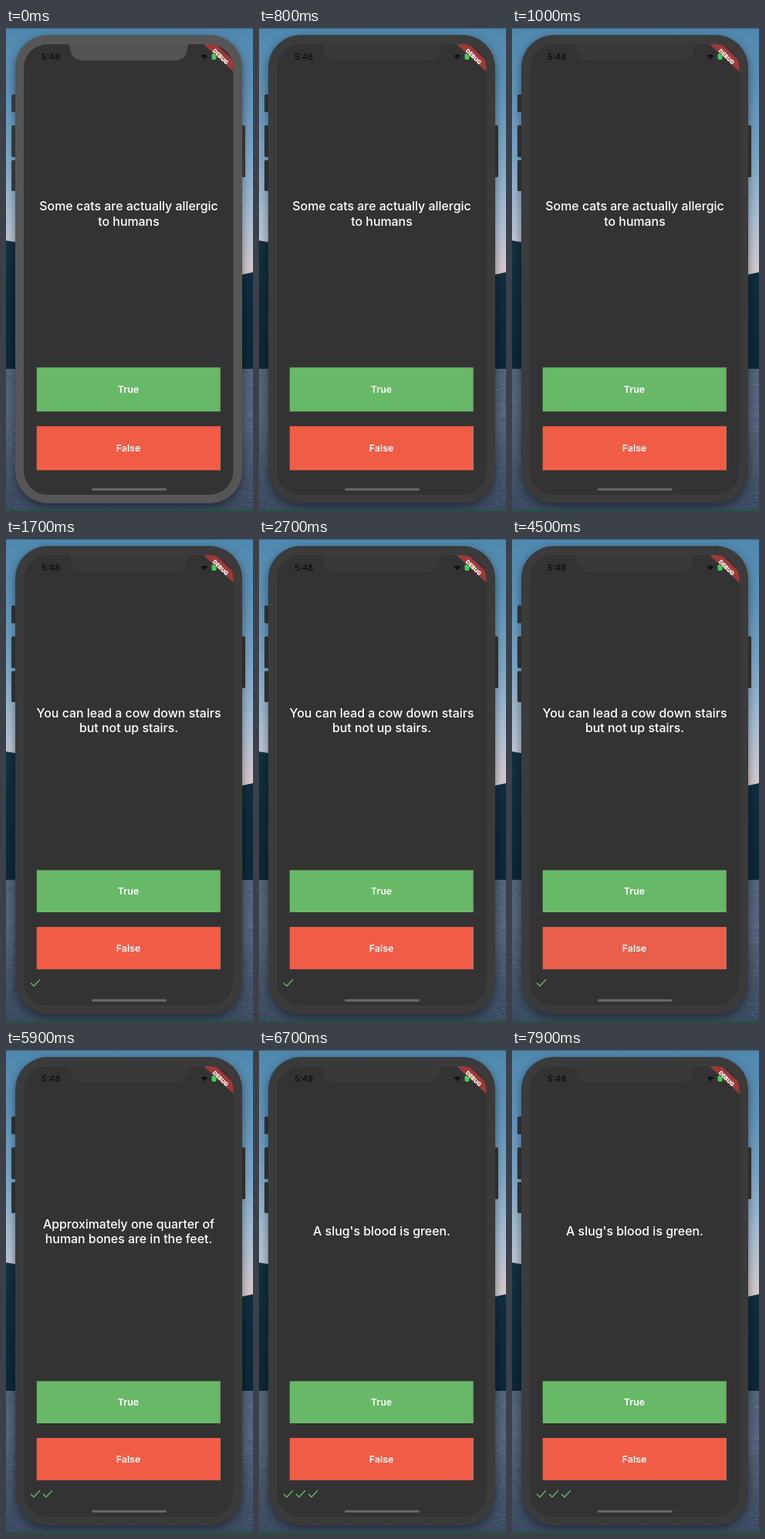
An HTML page with a canvas that plays this animation: 320x625 px, repeating every 8 s.

```html
<!DOCTYPE html>
<html lang="en">
<head>
<meta charset="utf-8">
<title>Quiz</title>
<style>
html, body { margin: 0; width: 100%; height: 100%; overflow: hidden; background: #333; }
canvas { display: block; }
</style>
</head>
<body>
<canvas id="stage" width="320" height="625"></canvas>
<script>
const ctx = document.getElementById('stage').getContext('2d');
const LOOP = 8000;
const GREEN = '#68b967', RED = '#f15c46';

const questions = [
  { from: 0, lines: ['Some cats are actually allergic', 'to humans'] },
  { from: 1400, lines: ['You can lead a cow down stairs', 'but not up stairs.'] },
  { from: 4620, lines: ['Approximately one quarter of', 'human bones are in the feet.'] },
  { from: 6080, lines: ["A slug's blood is green."] },
];
const taps = [
  { at: 1210, button: 'True', x: 190, dy: 2 },
  { at: 4430, button: 'False', x: 172, dy: 10 },
  { at: 5880, button: 'True', x: 192, dy: 2 },
];

const clamp = v => Math.max(0, Math.min(1, v));

function box(x, y, w, h, r, fill) {
  ctx.beginPath();
  ctx.roundRect(x, y, w, h, r);
  ctx.fillStyle = fill;
  ctx.fill();
}

function gradient(y0, y1, ...colors) {
  const g = ctx.createLinearGradient(0, y0, 0, y1);
  colors.forEach((c, i) => g.addColorStop(i / (colors.length - 1), c));
  return g;
}

function label(text, x, y, font, fill = '#fff', align = 'center') {
  ctx.font = font + ' Inter, sans-serif';
  ctx.textAlign = align;
  ctx.fillStyle = fill;
  ctx.fillText(text, x, y);
}

function stroke(points, color, width) {
  ctx.beginPath();
  points.forEach(([x, y]) => ctx.lineTo(x, y));
  ctx.strokeStyle = color;
  ctx.lineWidth = width;
  ctx.stroke();
}

function polygon(points, fill) {
  ctx.beginPath();
  points.forEach(([x, y]) => ctx.lineTo(x, y));
  ctx.fillStyle = fill;
  ctx.fill();
}

function landscape() {
  box(0, 0, 320, 330, 0, gradient(0, 325, '#4f88ae', '#5e92b8', '#7aa5c6', '#abbfd2', '#d9cbcd'));
  polygon([[0, 275], [12, 277], [160, 300], [306, 319], [320, 316], [320, 442], [0, 442]],
    gradient(275, 442, '#12303f', '#0e2b3c', '#0c2737'));
  box(0, 441, 320, 184, 0, gradient(441, 625, '#53637a', '#55647c', '#47566c', '#3a4a60'));
  let seed = 7;
  const random = () => (seed = seed * 16807 % 2147483647) / 2147483647;
  for (let i = 0; i < 260; i++) {
    const x = random() < .5 ? random() * 14 : 304 + random() * 16;
    const shade = random() < .5 ? '#2b3b5233' : '#8796aa33';
    box(x, 444 + random() * 178, 2 + random() * 5, 1, 0, shade);
  }
  box(0, 0, 320, 1, 0, '#35617c');
  box(0, 624, 320, 1, 0, '#066a26');
}

function phone(focus) {
  const shade = (from, to) => {
    const v = Math.round(from + (to - from) * focus);
    return `rgb(${v},${v},${v})`;
  };
  const side = shade(64, 54);
  for (const [x, y, h] of [[7, 86, 23], [7, 126, 41], [7, 171, 40], [304, 126, 67]]) {
    box(x, y, 6, h, 1.5, side);
  }
  ctx.save();
  ctx.shadowColor = 'rgba(0,0,0,.45)';
  ctx.shadowBlur = 12;
  ctx.shadowOffsetY = 4;
  box(12, 9, 294, 606, 42, shade(86, 59));
  ctx.restore();
  box(23, 21, 271.5, 583, 31, '#333');

  ctx.beginPath();
  ctx.moveTo(78, 21);
  ctx.quadraticCurveTo(83, 21, 83, 26);
  ctx.quadraticCurveTo(84, 42, 101, 42);
  ctx.lineTo(217, 42);
  ctx.quadraticCurveTo(234, 42, 235, 26);
  ctx.quadraticCurveTo(235, 21, 240, 21);
  ctx.fillStyle = shade(84, 57);
  ctx.fill();
  box(111, 595.5, 97, 3, 1.5, '#6a6a6a');
}

function statusBar() {
  label('5:48', 46, 41, '500 11px', '#0c0c0c', 'left');
  for (const r of [2, 5]) {
    ctx.beginPath();
    ctx.arc(257, 40.5, r, -Math.PI * .75, -Math.PI * .25);
    ctx.strokeStyle = '#080808';
    ctx.lineWidth = 2;
    ctx.stroke();
  }
  box(266.5, 33, 6, 8, 2, '#3fd05a');
  ctx.save();
  ctx.beginPath();
  ctx.roundRect(23, 21, 271.5, 583, 31);
  ctx.clip();
  polygon([[256, 21], [272, 21], [295, 43], [295, 57]], '#9c3a37');
  ctx.translate(278, 37);
  ctx.rotate(Math.PI / 4);
  label('DEBUG', 0, 2.6, '900 7.2px');
  ctx.restore();
}

function button(text, y, h, color, t) {
  box(38.5, y, 2, h, 0, color === RED ? '#7c2a22' : '#1d5a24');
  box(40, y, 237, h, 0, color);
  box(276.5, y, 1.5, h, 0, '#8c8480');
  ctx.save();
  ctx.beginPath();
  ctx.rect(40, y, 237, h);
  ctx.clip();
  for (const tap of taps) {
    const age = t - tap.at;
    if (tap.button !== text || age < 0 || age > 420) continue;
    const fade = clamp((420 - age) / 200);
    const tint = a => `rgba(130,130,130,${a * fade})`;
    box(40, y, 237, h, 0, tint(.2 * clamp(age / 200)));
    ctx.beginPath();
    ctx.arc(tap.x, y + h / 2 + tap.dy, 2 + 150 * clamp(age / 400) ** 3, 0, 7);
    ctx.fillStyle = tint(.2);
    ctx.fill();
  }
  ctx.restore();
  label(text, 158.5, y + h / 2 + 4.3, '600 12.4px');
}

function draw(t) {
  const index = questions.findLastIndex(q => t >= q.from);
  const { lines } = questions[index];
  landscape();
  phone(clamp((t - 150) / 350));
  statusBar();

  const base = (index ? 240.3 : 245.8) - (lines.length - 1) * 9.8;
  lines.forEach((line, i) => label(line, 159, base + i * 19.6, '500 15.9px'));

  const height = index ? 54.6 : 57;
  button('True', index ? 428.4 : 439.2, height, GREEN, t);
  button('False', index ? 502.1 : 515.2, height, RED, t);
  for (let i = 0; i < index; i++) {
    const x = 32 + i * 16;
    stroke([[x, 574.5], [x + 4, 578.5], [x + 12, 570]], '#62bd66', 1.3);
  }
}

function tick(now) {
  draw(now % LOOP);
  requestAnimationFrame(tick);
}
requestAnimationFrame(tick);
</script>
</body>
</html>
```
